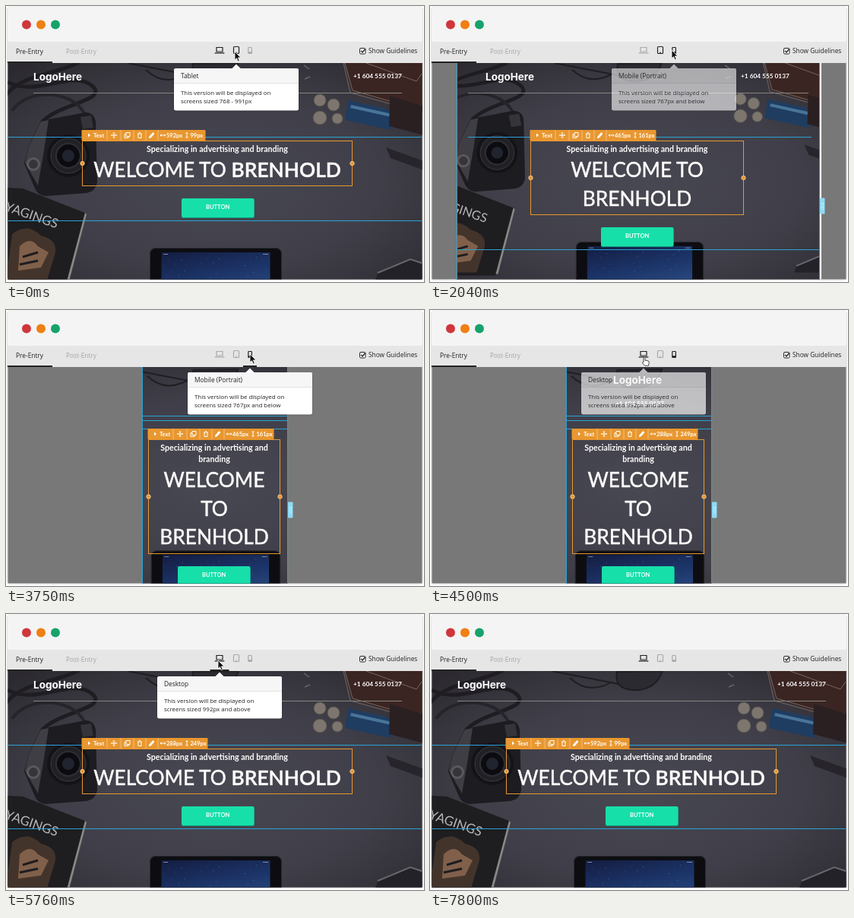
An HTML page for the animation above (7830 ms loop, 550 by 363 pixels).

```html
<!DOCTYPE html>
<html lang="en">
<head>
<meta charset="utf-8">
<title>Responsive preview</title>
<style>
html, body { margin: 0; width: 100%; height: 100%; overflow: hidden; background: #fff; }
svg { display: block; width: 550px; height: 363px; }
text { font-family: "Open Sans", sans-serif; font-size: 8.35px; white-space: pre; }
.lato { font-family: Lato, sans-serif; font-weight: 700; fill: #fff; }
.title { font-weight: 400; stroke: #fff; stroke-width: .45px; }
.logo { font: 700 13.5px Inter, sans-serif; fill: #fff; }
.mid { text-anchor: middle; }
</style>
</head>
<body>
<svg viewBox="0 0 550 363">
  <defs>
    <radialGradient id="desk" cx=".5" cy=".55" r=".72">
      <stop offset="0" stop-color="#484852"/><stop offset=".55" stop-color="#403f49"/><stop offset="1" stop-color="#2b292f"/>
    </radialGradient>
    <linearGradient id="screen" x2=".4" y2="1">
      <stop offset="0" stop-color="#141d42"/><stop offset=".5" stop-color="#1c3468"/><stop offset="1" stop-color="#2b4f86"/>
    </linearGradient>
    <clipPath id="view"><rect x="2.500" y="75" width="545" height="284.500"/></clipPath>
    <clipPath id="page"><rect id="pageRect" y="75" height="285"/></clipPath>
  </defs>
  <rect x="1" y="0" width="548" height="361" rx="5" fill="#e4e4e4"/>
  <rect x="2" y="0" width="546" height="360" rx="4" fill="#f4f4f4"/>
  <circle cx="27" cy="24.500" r="6" fill="#d0353b"/>
  <circle cx="46" cy="24.500" r="6" fill="#f07f13"/>
  <circle cx="65" cy="24.500" r="6" fill="#17a36b"/>
  <rect x="2" y="47" width="546" height="29" fill="#e6e6e6"/>
  <rect x="2" y="73" width="59" height="2" fill="#222"/>
  <text x="13" y="63" fill="#222">Pre-Entry</text>
  <text x="79" y="63" fill="#a5a5a5">Post-Entry</text>
  <rect x="465.500" y="55.500" width="7.500" height="7.500" rx="1.500" fill="#fff" stroke="#222"/>
  <path d="M467 59l2 2 3.500-4.500" fill="none" stroke="#222" stroke-width="1.400"/>
  <text x="477" y="62" fill="#222">Show Guidelines</text>
  <g clip-path="url(#view)">
    <rect x="2" y="75" width="546" height="285" fill="#787878"/>
    <g clip-path="url(#page)">
      <rect x="2" y="75" width="546" height="285" fill="url(#desk)"/>
      <g id="photo">
        <g fill="none" stroke="#1f1d22">
          <path d="M-4 122C20 88 62 92 96 74M2 100C40 120 86 84 112 104S70 128 48 152" stroke-width="5"/>
          <path d="M8 138C28 108 80 112 98 134S92 150 84 156" stroke="#26242a" stroke-width="4"/>
          <path d="M160 75L248 92M184 84C205 104 226 97 240 89" stroke-width="2"/>
          <path d="M246 76q-4 22 20 24 30 2 40-25z" fill="#2b2a31" stroke-width="2"/>
          <path d="M392 78l7 5M393 96l7-3" stroke="#68666c" stroke-width="1.500"/>
        </g>
        <path d="M46 151L104 140Q116 140 118 152L120 232Q118 244 106 246L52 250Q42 249 38 240L24 207 30 184z" fill="#1d1c21"/>
        <path d="M46 152l10-2-6 40-8 46-17-30 5-21z" fill="#3f3e44"/>
        <circle cx="36" cy="208" r="9" fill="#5a595e"/><circle cx="36" cy="208" r="6" fill="#36353a"/>
        <path d="M98 146l14-2 3 16-14 2z" fill="#35343a"/>
        <circle cx="82" cy="197" r="28" fill="#141418"/>
        <circle cx="82" cy="197" r="23" fill="#202025" stroke="#3c3b41"/>
        <circle cx="82" cy="197" r="16" fill="#0c0c10" stroke="#2f2e35" stroke-width="2"/>
        <circle cx="82" cy="197" r="8" fill="#20242f"/>
        <path d="M446 75H550V140L455 112z" fill="#3b2522"/>
        <path d="M446 75l10 36 94 27v3l-97-27-9-39zM474 75l66 24 10-14" fill="none" stroke="#77655c"/>
        <path d="M450 124l62 14-6 25-60-13z" fill="#1f3d60"/>
        <path d="M454 130l54 12-1 4-54-12z" fill="#49749a"/>
        <path d="M505 118l45 14v38l-46-12z" fill="#2a2021"/>
        <path d="M500 186l50 18v12l-44-16z" fill="#27252b"/>
        <path d="M486 360l4-10 42-18 18 6v22z" fill="#232228"/>
        <path d="M489 351l43-18 18 6" fill="none" stroke="#68676e" stroke-width="2"/>
        <g fill="#7c766e" stroke="#57524f">
          <circle cx="413" cy="124" r="8"/><circle cx="431" cy="130" r="8"/>
          <circle cx="413" cy="147" r="9"/><circle cx="436" cy="148" r="7"/>
        </g>
        <path d="M-20 238L22 240 104 272 80 364H-20z" fill="#1e1d20"/>
        <path d="M104 272l2 2-23 88h-3z" fill="#8b8885"/>
        <path d="M8 300q20-16 38 2 24 6 18 26l-10 32H0z" fill="#43342b"/>
        <path d="M18 316q14-14 24 0l14 8-10 20-30 4z" fill="#80604a"/>
        <path d="M22 330l20-6M18 340l24-5" stroke="#1e1d20" stroke-width="3"/>
        <text transform="translate(-25 261) rotate(19)" style="font:400 17px Lato,sans-serif" fill="#b9b7b6">VOYAGINGS</text>
        <g transform="translate(0 318)">
          <rect x="189.500" y=".5" width="173" height="80" rx="7" fill="#0d0d11" stroke="#2b2a31"/>
          <rect x="204.500" y="6" width="143" height="76" fill="url(#screen)"/>
          <path d="M207 8.500h6M338 8.500h7" stroke="#7d88a3"/>
          <g id="stars" fill="#5f80b4"></g>
        </g>
      </g>
    </g>
    <g id="layout"></g>
  </g>
  <g id="ui"></g>
</svg>
<script>
const $ = id => document.getElementById(id);
const LOOP = 7830, CYAN = '#2ba3d4', ORANGE = '#e9972f', NAME = 'BRENHOLD';
const clamp = v => Math.max(0, Math.min(1, v));
const ramp = (t, a, b) => clamp((t - a) / (b - a));
const ease = p => p * p * (3 - 2 * p);

const layouts = {
  desktop: { page: [2, 548], logo: [36, 98], phone: [457, 95], head: [114, 36, 521], guide: [172, 2, 548],
    base: 282, box: [100, 177, 356, 60], button: [231, 253], zoom: 1, drop: 0 },
  tablet: { page: [35, 513], logo: [73, 98], phone: [409, 95], head: [114, 50, 498], guide: [172, 50, 502],
    base: 320, box: [132, 177, 281, 98], button: [225, 291], zoom: .967, drop: 0 },
  mobile: { page: [179, 371], logo: [241, 97], phone: [244, 126], head: [139, 179, 371], guide: [156, 179, 371],
    base: 361, box: [187, 170, 174, 151], button: [226, 337], zoom: .98, drop: 3 }
};
// A click on a device switches the layout at once; the size label follows later.
const TO_TABLET = 850, TO_MOBILE = 3690, TO_DESKTOP = 5650, LABEL_LAG = 400;
const pick = (t, desktop, tablet, mobile) =>
  t < TO_TABLET || t >= TO_DESKTOP ? desktop : t < TO_MOBILE ? tablet : mobile;
const devices = [
  { x: 281, title: 'Desktop', range: '992px and above', from: 4400, to: 6700 },
  { x: 303, title: 'Tablet', range: '768 - 991px', from: -200, to: 1750 },
  { x: 321, title: 'Mobile (Portrait)', range: '767px and below', from: 1950, to: 4150 }
];

const line = (x1, y1, x2, y2, color, extra = '') =>
  `<path d="M${x1} ${y1}L${x2} ${y2}" stroke="${color}" ${extra}/>`;
const rect = (x, y, w, h, fill, extra = '') =>
  `<rect x="${x}" y="${y}" width="${w}" height="${h}" fill="${fill}" ${extra}/>`;
const lato = (x, y, size, text, cls = '') =>
  `<text class="lato ${cls}" x="${x}" y="${y}" style="font-size:${size}px">${text}</text>`;

function toolbar(x, y, w, h) {
  const width = h > 99 ? 166 : 163;
  const seps = [33, 51, 68, 84, 100].map(d => line(d, 0, d, 14, '#f3bd7c')).join('');
  return `<g transform="translate(${x} ${y - 14})">${rect(-.5, 0, width, 14, ORANGE, 'rx="1"')}${seps}
    <path d="M8 4.500l3 2.500-3 2.500z" fill="#fff"/>
    <g fill="none" stroke="#fff">
      <path d="M38.500 7h7M42 3.500v7M41 4.500l1-1 1 1M41 9.500l1 1 1-1M39.500 6l-1 1 1 1M44.500 6l1 1-1 1"/>
      <path d="M58 3.500h5v5h-5zM58 5.500h-2v5h5v-2"/>
      <path d="M73 5h6M74 5v5.500h4V5M75 3.500h2"/>
      <path d="M88.500 10.500l.5-2 4.500-5 1.500 1.500-4.500 5z" fill="#fff"/>
      <path d="M103 7h7M104.500 5.500L103 7l1.500 1.500M108.500 5.500L110 7l-1.500 1.500"/>
      <path d="M138 3.500v7M136.500 5l1.500-1.500L139.500 5M136.500 9l1.500 1.500L139.500 9"/>
    </g>
    ${lato(15, 9.8, 7.5, 'Text')}${lato(111, 9.8, 7.5, w + 'px')}${lato(142.5, 9.8, 7.5, h + 'px')}</g>`;
}

function headline(x, y, w) {
  const cx = x + w / 2;
  const subs = w < 190
    ? ['Specializing in advertising and', 'branding']
    : ['Specializing in advertising and branding'];
  const lines = w > 330 ? [`WELCOME TO <tspan font-weight="600">${NAME}</tspan>`]
    : w > 185 ? ['WELCOME TO', NAME] : ['WELCOME', 'TO', NAME];
  return subs.map((s, i) => lato(cx, y + 15 + 15 * i, 10.65, s, 'mid')).join('') +
    lines.map((s, i) => lato(cx, y + 33 + 15 * subs.length + 37.5 * i, 26.3, s, 'mid title')).join('');
}

function drawLayout(t) {
  const s = layouts[pick(t, 'desktop', 'tablet', 'mobile')];
  const [L, R] = s.page, [headY, headL, headR] = s.head, [guideY, guideL, guideR] = s.guide;
  const [x, y, w, h] = s.box, [btnX, btnY] = s.button;
  const small = s === layouts.mobile;
  $('pageRect').setAttribute('x', L);
  $('pageRect').setAttribute('width', R - L);
  $('photo').setAttribute('transform', `translate(275 ${75 + s.drop}) scale(${s.zoom}) translate(-275 -75)`);
  const size = pick(t < LABEL_LAG ? 0 : t - LABEL_LAG, [592, 99], [465, 161], [288, 249]);
  const edges = s === layouts.desktop ? '' :
    line(L + .5, 75, L + .5, 360, CYAN) + line(R - .5, 75, R - .5, 360, CYAN);
  const knob = kx => `<circle cx="${kx}" cy="${y + h / 2}" r="2.700" fill="${ORANGE}" stroke="#f8d9a8" stroke-width=".8"/>`;
  const grip = gx => line(gx, 259, gx, 268, '#fff', 'stroke-dasharray="1 1.500"');
  $('layout').innerHTML =
    (small ? line(L, 145.5, R, 145.5, CYAN) : rect(R, 75, 2, 285, '#fff')) +
    rect(R, 252.5, 6.5, 21, '#8fd9f2', 'rx="1"') + grip(R + 2.5) + grip(R + 4.5) +
    line(headL, headY + .5, headR, headY + .5, small ? CYAN : '#85847f') +
    line(guideL, guideY + .5, guideR, guideY + .5, CYAN) +
    line(L, s.base + .5, R, s.base + .5, CYAN) + edges +
    `<text class="logo" x="${s.logo[0]}" y="${s.logo[1]}">LogoHere</text>` +
    lato(...s.phone, 8.3, '+1 604 555 0137') +
    rect(btnX, btnY + 1, 95.5, 25, '#0c9b78', 'rx="2"') +
    rect(btnX, btnY, 95.5, 25, '#17dfa9', 'rx="2"') +
    lato(btnX + 47.7, btnY + 14.3, 7.5, 'BUTTON', 'mid') +
    rect(x + .5, y + .5, w - 1, h - 1, 'none', `stroke="${ORANGE}"`) +
    knob(x + .5) + knob(x + w - .5) + headline(x, y, w) + toolbar(x, y, ...size);
}

const icons = [
  c => `<path d="M277 54.500h8v5.500h-8z" fill="none" stroke="${c}" stroke-width="1.200"/>${rect(274.5, 61.3, 13, 1.2, c, 'rx=".6"')}`,
  c => `<rect x="299.500" y="53.500" width="7" height="9" rx="1" fill="none" stroke="${c}" stroke-width="1.200"/>${rect(302, 60.7, 2, 1, c)}`,
  c => `<rect x="318.800" y="54.500" width="4.600" height="8" rx=".8" fill="none" stroke="${c}" stroke-width="1.200"/>${rect(319, 60.2, 4, 2, c)}`
];

function tooltip({ x, title, range, from, to }, t) {
  const alpha = Math.min(ramp(t, from, from + 150), 1 - ramp(t, to, to + 180));
  if (!alpha) return '';
  return `<g opacity="${alpha}" transform="translate(${x - 82} 82)">
    ${rect(-.5, .5, 165, 56, '#000', 'rx="3" opacity=".25"')}${rect(0, 0, 164, 55.5, '#fff', 'rx="2.500"')}
    ${rect(0, 0, 164, 19, '#f6f6f6', 'rx="2.500"')}${line(0, 19.5, 164, 19.5, '#e2e2e2')}
    <path d="M76 .500l6-6 6 6z" fill="#fff"/>
    <g fill="#222"><text x="9" y="13">${title}</text>
    <text x="9" y="35" style="font-size:7.9px">This version will be displayed on</text>
    <text x="9" y="46" style="font-size:7.9px">screens sized ${range}</text></g></g>`;
}

// Pointer stops: [move start, move end, x, y]
const stops = [[300, 500, 302, 60], [1720, 1930, 318, 58], [2500, 2900, 321, 58], [4130, 4400, 279, 61], [6600, 6900, 283, 49]];

function pointer(t) {
  if (t >= 6900) return '';
  let x = 301, y = 60;
  for (const [a, b, nx, ny] of stops) {
    const p = ease(ramp(t, a, b));
    x += (nx - x) * p;
    y += (ny - y) * p;
  }
  const hand = t > 4380 && t < 4900;
  const d = hand
    ? 'M2 1q1.500-1 2 .500v4l1-.500 1 .700 1-.300 1 .800q1.500 0 1.200 2l-.700 4h-5L.500 8.500q0-1.500 1.500-.800z'
    : 'M0 0v11l2.500-2.300 1.800 4 1.900-.800-1.800-4H8z';
  return `<path transform="translate(${x} ${y})" d="${d}" fill="${hand ? '#fff' : '#111'}" stroke="${hand ? '#222' : '#fff'}" stroke-width=".8"/>`;
}

function drawUi(t) {
  const selected = pick(t, 0, 1, 2);
  const hovered = t < 1850 ? 1 : t < 4250 ? 2 : t < 6750 ? 0 : -1;
  const half = [12.5, 10, 9][selected];
  const mark = selected === hovered ? rect(devices[selected].x - half, 73, 2 * half, 2, '#222') : '';
  $('ui').innerHTML = mark +
    icons.map((icon, i) => icon(i === selected || i === hovered ? '#222' : '#aaa')).join('') +
    devices.map(d => tooltip(d, t)).join('') + pointer(t);
}

let stars = '';
for (let i = 0; i < 40; i++)
  stars += `<circle cx="${206 + (i * 61.8) % 140}" cy="${12 + (i * 17.3) % 34}" r="${.3 + i % 3 * .15}" opacity=".6"/>`;
$('stars').innerHTML = stars;

const start = performance.now();
function frame() {
  const t = (performance.now() - start) % LOOP;
  drawLayout(t);
  drawUi(t);
  requestAnimationFrame(frame);
}
frame();
</script>
</body>
</html>
```
